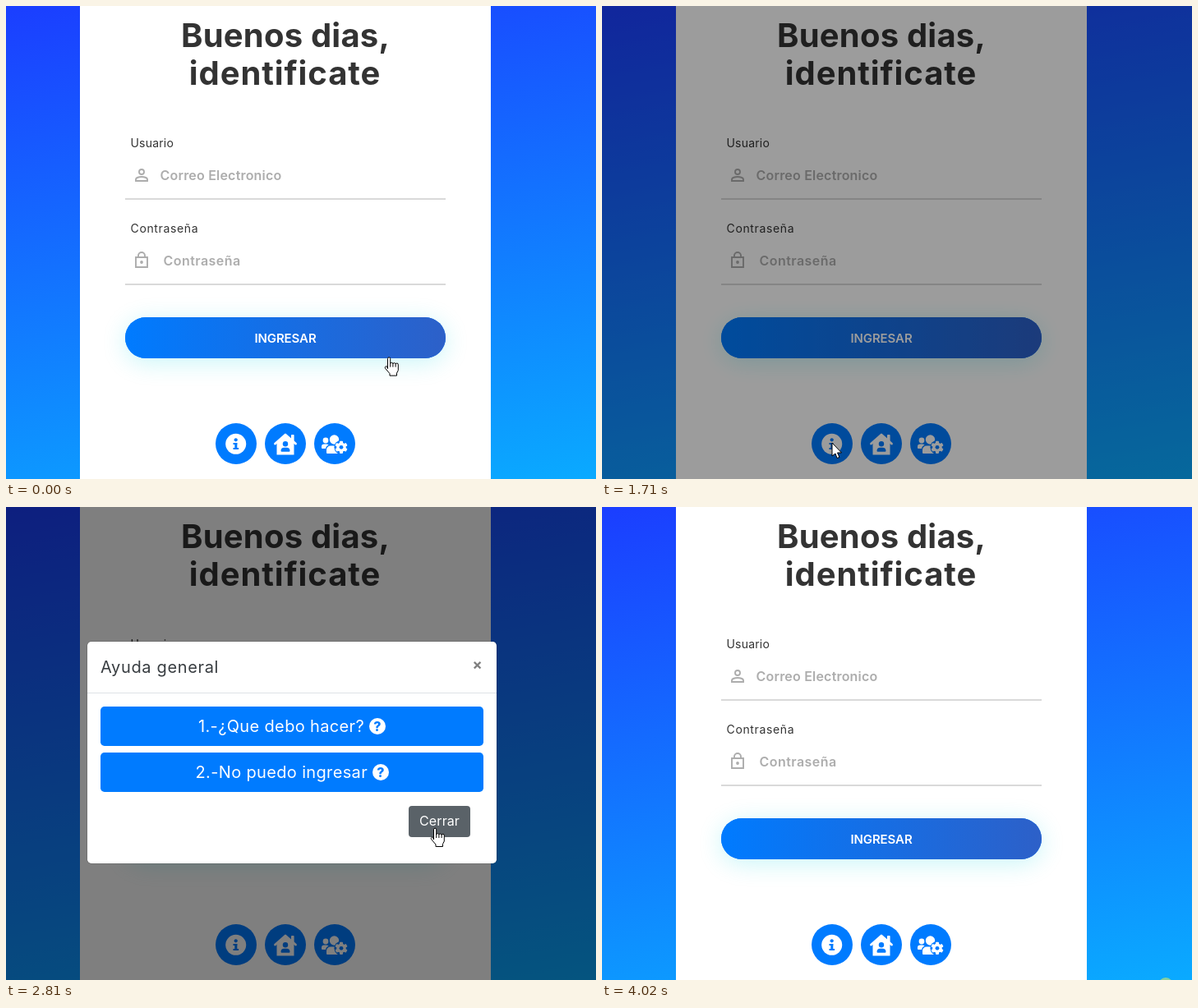
An HTML page with a canvas that plays this animation: 718 px wide and 576 px high, repeating every 4150 ms.

```html
<!DOCTYPE html>
<html lang="es">
<head>
<meta charset="utf-8">
<title>Ingreso</title>
<style>
html, body { margin: 0; width: 100%; height: 100%; overflow: hidden; }
canvas { display: block; }
</style>
</head>
<body>
<canvas id="stage" width="718" height="576"></canvas>
<script>
const W = 718, H = 576, LOOP = 4150;
const BLUE = '#007bff', INDIGO = '#2d60c8', GREY = '#adadad';
const stage = document.getElementById('stage').getContext('2d');
const dialog = Object.assign(document.createElement('canvas'), { width: W, height: H });
const dialogCtx = dialog.getContext('2d');
let c = stage;

const clamp = v => Math.min(1, Math.max(0, v));
const ramp = (t, start, length) => clamp((t - start) / length);
const linear = u => u;
const smooth = u => u * u * (3 - 2 * u);
const easeOut = u => 1 - (1 - u) ** 1.75;

// Hover that is left again; the way back is shortened like a CSS transition.
function hover(t, enter, leave, length) {
  const p = smooth(ramp(Math.min(t, leave), enter, length));
  return t < leave ? p : p * (1 - smooth(ramp(t, leave, length * p)));
}

function mix(a, b, p) {
  return `rgb(${a.map((v, i) => Math.round(v + (b[i] - v) * p))})`;
}

// The pointer travels along quadratic curves.
const home = [466, 428];
const legs = [
  { start: 0, end: 600, via: [467, 320], to: [345, 342], pace: linear },
  { start: 600, end: 1450, via: [237, 504], to: [280, 532], pace: linear },
  { start: 1990, end: 2740, via: [401, 462], to: [522, 391], pace: smooth },
  { start: 3060, end: 3600, via: [482, 370], to: [664, 551], pace: linear },
  { start: 3600, end: 3950, via: [672, 564], to: [681, 578], pace: linear }
];

function tip(t) {
  let pos = home;
  for (const { start, end, via, to, pace } of legs) {
    if (t < start) break;
    const u = pace(ramp(t, start, end - start)), v = 1 - u;
    pos = pos.map((a, i) => v * v * a + 2 * u * v * via[i] + u * u * to[i]);
  }
  return pos;
}

function text(str, x, y, size, weight, color, spacing = 0, align = 'left') {
  c.font = `${weight} ${size}px Inter, sans-serif`;
  c.letterSpacing = spacing + 'px';
  c.textAlign = align;
  c.fillStyle = color;
  c.fillText(str, x, y);
}

function box(x, y, w, h, r, color) {
  c.beginPath();
  c.roundRect(x, y, w, h, r);
  c.fillStyle = color;
  c.fill();
}

function disc(x, y, r, color) {
  box(x - r, y - r, 2 * r, 2 * r, r, color);
}

function line(d, width, color) {
  c.lineWidth = width;
  c.strokeStyle = color;
  c.stroke(new Path2D(d));
}

function background() {
  const g = c.createLinearGradient(0, 0, 120, 681);
  g.addColorStop(0, '#1b3eff');
  g.addColorStop(1, '#0aaaff');
  c.fillStyle = g;
  c.fillRect(0, 0, W, H);
  box(90, 0, 500, H, 0, '#fff');
}

function field(y, label, gap, hint, hintX, hintGap) {
  text(label, 151.5, y - 63, 14, 400, '#333', gap);
  text(hint, hintX, y - 23, 16, 600, GREY, hintGap);
  box(145, y - 1, 390, 2, 0, '#d9d9d9');
}

function form() {
  field(235, 'Usuario', .2, 'Correo Electronico', 187.5, .2);
  field(339, 'Contraseña', .65, 'Contraseña', 191.5, .45);
  line('M168 202a3 3 0 1 0-6 0a3 3 0 1 0 6 0z', 1.9, GREY);
  line('M158 213v-2c0-2 4-3 7-3s7 1 7 3v2z', 1.9, GREY);
  line('M158 306h14v12h-14zM161 305v-1a4 4 0 0 1 8 0v1', 1.9, GREY);
  disc(165, 312, 1.9, GREY);
}

function loginButton(p) {
  c.save();
  c.shadowColor = 'rgba(3,216,222,.22)';
  c.shadowBlur = 30;
  c.shadowOffsetY = 5;
  box(145, 379, 390, 50, 25, BLUE);
  c.restore();
  const x = 145 + 390 * p;
  const g = c.createLinearGradient(x - 390, 0, x + 390, 0);
  [INDIGO, BLUE, INDIGO].forEach((color, i) => g.addColorStop(i / 2, color));
  box(145, 379, 390, 50, 25, g);
  text('INGRESAR', 340, 410, 15, 600, '#fff', -.1, 'center');
}

function infoIcon(bg) {
  disc(280, 533, 25, bg);
  disc(279.7, 533.3, 12.5, '#fff');
  disc(279.7, 528.3, 2.1, bg);
  line('M276.5 533h4.8M276.5 539h6.6', 2.2, bg);
  line('M279.8 532v7', 3, bg);
}

function houseIcon() {
  disc(340, 533, 25, BLUE);
  box(347, 522, 3.6, 10, .8, '#fff');
  c.fillStyle = '#fff';
  c.fill(new Path2D('M340 522L350.5 532V546.5H329.5V532Z'));
  c.lineCap = c.lineJoin = 'round';
  line('M327.5 533L340 522L352.5 533', 2.8, '#fff');
  c.lineCap = 'butt';
  c.lineJoin = 'miter';
  disc(340, 533.2, 3.2, BLUE);
  box(334.5, 537.7, 11, 5, [4, 4, 1, 1], BLUE);
}

function gear(x, y) {
  disc(x, y, 8.6, BLUE);
  disc(x, y, 5.7, '#fff');
  for (let i = 0; i < 6; i++) {
    c.save();
    c.translate(x, y);
    c.rotate(i * Math.PI / 3);
    box(-2, -7.6, 4, 5, .8, '#fff');
    c.restore();
  }
  disc(x, y, 2.4, BLUE);
}

function usersIcon() {
  disc(400, 533, 25, BLUE);
  disc(389, 529, 3.4, '#fff');
  box(384, 533.5, 9, 5.5, [3, 3, 1, 1], '#fff');
  disc(399.5, 528, 6.7, BLUE);
  disc(399.5, 528, 5.7, '#fff');
  box(389, 534.5, 20, 12, 5, BLUE);
  box(390, 535.5, 18, 9.5, [5, 5, 1, 1], '#fff');
  gear(408, 537.3);
}

function helpButton(str, x, y, iconX) {
  box(115, y, 466, 48, 4.8, BLUE);
  text(str, x, y + 31, 20, 400, '#fff', .35);
  disc(iconX, y + 24, 10, '#fff');
  text('?', iconX, y + 30, 16, 800, BLUE, 0, 'center');
}

function drawDialog(p) {
  c = dialogCtx;
  c.clearRect(0, 0, W, H);
  box(98.5, 163.5, 499, 271, 5, 'rgba(0,0,0,.2)');
  box(99, 164, 498, 270, 4.8, '#fff');
  text('Ayuda general', 115, 202, 20, 400, '#383d41', .65);
  text('×', 573.5, 198, 18, 700, '#7f7f7f', 0, 'center');
  box(99, 226, 498, 1, 0, '#dee2e6');
  helpButton('1.-¿Que debo hacer?', 234, 243, 452);
  helpButton('2.-No puedo ingresar', 230.5, 299, 456);
  box(490, 364, 75, 38, 4, mix([108, 117, 125], [90, 98, 104], p));
  text('Cerrar', 527.5, 388, 16, 400, '#fff', .1, 'center');
  c = stage;
}

const arrow = new Path2D('M0 0V16L4 13L6 18.5L9 17.5L6.5 12H11.5Z');
const knuckle = 'a1.6 1.6 0 0 1 3.2 .4';
const hand = new Path2D(`M-1.5 14V1.8a1.6 1.6 0 0 1 3.2 0V8${knuckle.repeat(3)}V16L9.5 19.5V22.5H1V20L-4.5 13.5a1.6 1.6 0 0 1 2-2.3z`);
const fingers = new Path2D('M1.7 8v4M4.9 8.5v3.5M8.1 9v3');

function pointer(t) {
  const [x, y] = tip(t);
  const onLogin = t < 1000 && y > 379 && y < 429;
  const onClose = t > 2600 && t < 3150 && y < 402;
  const isHand = onLogin || onClose;
  const shape = isHand ? hand : arrow;
  c.save();
  c.translate(x, y);
  c.fillStyle = '#fff';
  c.strokeStyle = '#000';
  c.lineWidth = 1;
  c.lineJoin = 'round';
  c.fill(shape);
  c.stroke(shape);
  if (isHand) c.stroke(fingers);
  c.restore();
}

function draw(t) {
  background();
  text('Buenos dias,', 340, 50, 40, 700, '#333', .2, 'center');
  text('identificate', 339.5, 96, 40, 700, '#333', .9, 'center');
  form();
  loginButton(hover(t, 0, 170, 400) + hover(t, 700, 865, 400));
  const dark = smooth(ramp(t, 1150, 250)) * (1 - ramp(t, 1595, 100));
  infoIcon(mix([0, 123, 255], [51, 51, 51], dark));
  houseIcon();
  usersIcon();

  const shade = ramp(t, 1595, 150) * (1 - ramp(t, 3303, 150));
  c.fillStyle = `rgba(0,0,0,${shade / 2})`;
  c.fillRect(0, 0, W, H);

  // Dialog slides in from above and leaves the same way.
  const out = t < 3060 ? 0 : t - 3005;
  const alpha = ramp(t, 1770, 150) * (1 - clamp(out / 150));
  if (alpha > 0) {
    const shift = easeOut(ramp(t, 1770, 300)) - easeOut(clamp(out / 300)) - 1;
    drawDialog(smooth(ramp(t, 2660, 150)));
    c.globalAlpha = alpha;
    c.drawImage(dialog, 0, Math.round(50 * shift));
    c.globalAlpha = 1;
  }
  if (t >= 3960) disc(686, 582, 9, '#86cfa0');
  else pointer(t);
}

const begin = performance.now();
function frame() {
  draw((performance.now() - begin) % LOOP);
  requestAnimationFrame(frame);
}
draw(0);
requestAnimationFrame(frame);
</script>
</body>
</html>
```
